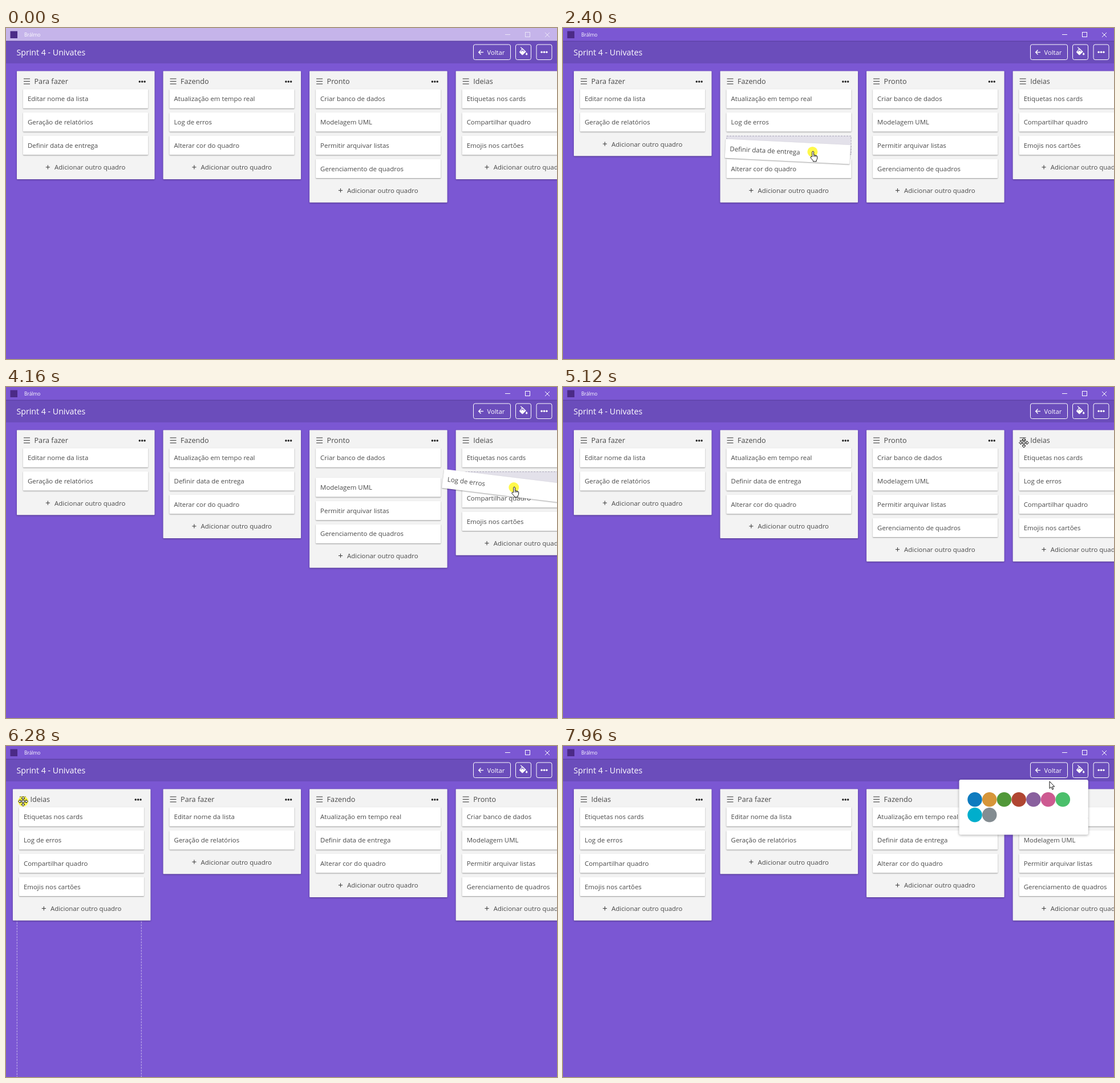
Write an HTML page with a canvas that moves like this. It is 966 px wide and 580 px high and loops after 8000 ms.

```html
<!DOCTYPE html>
<html lang="pt">
<head>
<meta charset="utf-8">
<title>Quadro</title>
<style>
html, body { margin: 0; width: 100%; height: 100%; overflow: hidden; background: #7b57d3; }
canvas { display: block; }
</style>
</head>
<body>
<canvas id="stage" width="966" height="580"></canvas>
<script>
const ctx = document.getElementById('stage').getContext('2d');
const LOOP = 8000, SETTLE = 240, PITCH = 40.75, CARD_W = 219, CARD_H = 33.4, COL_W = 241.5;
const BG = '#7b57d3', INK = '#4a4a4a';

const titles = ['Para fazer', 'Fazendo', 'Pronto', 'Ideias'];
const cards = {
  a: 'Editar nome da lista', b: 'Geração de relatórios', c: 'Definir data de entrega',
  d: 'Atualização em tempo real', e: 'Log de erros', f: 'Alterar cor do quadro',
  g: 'Criar banco de dados', h: 'Modelagem UML', i: 'Permitir arquivar listas', j: 'Gerenciamento de quadros',
  k: 'Etiquetas nos cards', l: 'Compartilhar quadro', m: 'Emojis nos cartões'
};
const swatches = ['#0e7bbf', '#d6963a', '#519839', '#b04632', '#89609e', '#cd5a91', '#4bbf6b', '#00aecc', '#838c91'];

// Each list: [start time, value]
const boards = [
  [0, ['abc', 'def', 'ghij', 'klm']],
  [1860, ['ab', 'decf', 'ghij', 'klm']],
  [3800, ['ab', 'dcf', 'gehij', 'klm']],
  [4090, ['ab', 'dcf', 'ghij', 'kelm']]
];
const orders = [[0, '0123'], [5620, '0132'], [5823, '0312'], [6060, '3012']];
const cursors = [[0, 'arrow'], [740, 'hand'], [4800, 'arrow'], [5040, 'move'], [6420, 'arrow'], [7160, 'hand'], [7780, 'arrow']];
const cardDrags = [{ id: 'c', from: 920, to: 2640 }, { id: 'e', from: 3440, to: 4420 }];
const colDrag = { id: '3', from: 5360, to: 6320 };
const presses = [...cardDrags, colDrag, { from: 7640, to: 7740 }];
const POPUP = 7680;

// Pointer path: time, x, y
const route = [
  [80, 800, 564], [320, 630, 460], [560, 350, 285], [840, 183, 206], [1160, 183, 206],
  [1360, 205, 208], [1640, 246, 216], [1900, 335, 224], [2200, 425, 222], [2560, 441, 214],
  [2680, 441, 214], [3400, 411.5, 167], [3490, 411.5, 167], [3600, 427.5, 160], [3760, 530, 162],
  [3960, 700, 172], [4160, 890, 176], [4340, 925, 172], [4440, 925, 172], [4700, 900, 140],
  [5080, 808, 98], [5340, 808, 97], [5480, 765, 97], [5720, 565, 99], [5920, 334, 101],
  [6100, 95, 99], [6200, 30, 97], [6330, 30, 97], [6720, 393, 86], [6900, 720, 70],
  [7060, 850, 66], [7200, 866, 46], [7460, 905, 44], [7700, 905, 44], [7960, 853, 62]
];

const lerp = (a, b, u) => a + (b - a) * u;
const clamp = (v, lo, hi) => Math.min(hi, Math.max(lo, v));
const easeOut = u => 1 - (1 - clamp(u, 0, 1)) ** 3;
const during = (t, d) => t >= d.from && t < d.to;

function stageAt(list, t) {
  const i = list.findLastIndex(s => t >= s[0]);
  return { prev: list[Math.max(0, i - 1)][1], cur: list[i][1], u: i ? easeOut((t - list[i][0]) / 200) : 1 };
}

// Monotone cubic through the route points
function along(t, axis) {
  const last = route.length - 1;
  if (t <= route[0][0]) return route[0][axis];
  if (t >= route[last][0]) return route[last][axis];
  const i = route.findLastIndex(p => t >= p[0]);
  const slope = j => j < 0 || j >= last ? 0 : (route[j + 1][axis] - route[j][axis]) / (route[j + 1][0] - route[j][0]);
  const tangent = j => {
    const a = slope(j - 1), b = slope(j);
    return a * b > 0 ? 2 * a * b / (a + b) : 0;
  };
  const h = route[i + 1][0] - route[i][0], u = (t - route[i][0]) / h, v = 1 - u;
  return route[i][axis] * (1 + 2 * u) * v * v + route[i + 1][axis] * u * u * (3 - 2 * u)
    + h * (tangent(i) * u * v * v - tangent(i + 1) * u * u * v);
}
const pointer = t => ({ x: along(t, 1), y: along(t, 2) });

const slotX = i => 19 + 256.55 * i;

function colX(id, t) {
  const { prev, cur, u } = stageAt(orders, t), to = slotX(cur.indexOf(id));
  return id === colDrag.id ? to : lerp(slotX(prev.indexOf(id)), to, u);
}

function cardSlot(id, t) {
  const { prev, cur, u } = stageAt(boards, t);
  const col = cur.findIndex(c => c.includes(id));
  const row = cur[col].indexOf(id), old = prev[col].indexOf(id);
  const held = cardDrags.some(d => d.id === id && t >= d.from && t < d.to + SETTLE);
  return { x: colX(String(col), t) + 11, y: 107.3 + PITCH * (old < 0 || held ? row : lerp(old, row, u)) };
}

// Follows the pointer, then settles into the slot
function dragPose(drag, t, home, slot) {
  const a = pointer(drag.from), b = pointer(Math.min(t, drag.to)), u = easeOut((t - drag.to) / SETTLE);
  return { x: lerp(home.x + b.x - a.x, slot.x, u), y: lerp(home.y + b.y - a.y, slot.y, u) };
}

function text(str, x, y, size, color, weight = 400) {
  ctx.font = `${weight} ${size}px "Open Sans", "Noto Sans", sans-serif`;
  ctx.fillStyle = color;
  ctx.fillText(str, x, y);
}
function box(x, y, w, h, fill, r = 0) {
  ctx.fillStyle = fill;
  ctx.beginPath();
  ctx.roundRect(x, y, w, h, r);
  ctx.fill();
}
function line(color, width, ...pts) {
  ctx.strokeStyle = color;
  ctx.lineWidth = width;
  ctx.beginPath();
  for (let i = 0; i < pts.length; i += 2) ctx.lineTo(pts[i], pts[i + 1]);
  ctx.stroke();
}
function dot(x, y, r, color) {
  ctx.fillStyle = color;
  ctx.beginPath();
  ctx.arc(x, y, r, 0, 7);
  ctx.fill();
}
function dots(x, y, color) {
  for (const d of [-4.4, 0, 4.4]) dot(x + d, y, 1.75, color);
}
function shadow(color, blur, y) {
  ctx.shadowColor = color;
  ctx.shadowBlur = blur;
  ctx.shadowOffsetY = y;
}
const noShadow = () => shadow('transparent', 0, 0);
function dashed(x, y, w, h, color) {
  ctx.setLineDash([3, 2]);
  ctx.strokeStyle = color;
  ctx.lineWidth = 1;
  ctx.strokeRect(x, y, w, h);
  ctx.setLineDash([]);
}

function drawCard(id, x, y) {
  shadow('rgba(0,0,0,.38)', 2, 1);
  box(x, y, CARD_W, CARD_H, '#fff', 1);
  noShadow();
  text(cards[id], x + 8, y + 21, 11.45, INK);
}

function drawColumn(id, t, x, y) {
  const { prev, cur, u } = stageAt(boards, t);
  const h = 67.3 + PITCH * lerp(prev[id].length, cur[id].length, u);
  ctx.save();
  ctx.translate(x, y);
  shadow('rgba(0,0,0,.35)', 3, 1);
  box(0, 0, COL_W, h, '#f3f3f3', 1);
  noShadow();
  for (const ly of [13.5, 18, 22.5]) line('#444', 1.1, 12, ly, 23, ly);
  text(titles[id], 30.5, 22.6, 12.65, '#484848');
  dots(219.7, 18.6, '#222');
  line('#444', 1.1, 50.8, h - 21.2, 58, h - 21.2);
  line('#444', 1.1, 54.4, h - 24.8, 54.4, h - 17.6);
  text('Adicionar outro quadro', 66, h - 16.8, 11.45, INK);
  for (const c of cur[id]) {
    const slot = cardSlot(c, t), cx = 11, cy = slot.y - 75.5;
    if (cardDrags.some(d => d.id === c && t >= d.from + 150 && t < d.to + SETTLE)) {
      box(cx, cy, CARD_W, CARD_H, '#e3e1ea');
      dashed(cx + .5, cy + .5, CARD_W - 1, CARD_H - 1, '#aaa6b8');
    } else drawCard(c, cx, cy);
  }
  ctx.restore();
}

function drawColumns(t) {
  const held = t >= colDrag.from && t < colDrag.to + SETTLE;
  const slot = { x: colX(colDrag.id, t), y: 75.5 };
  if (held) dashed(slot.x + .3, 110.5, 218, 480, 'rgba(255,255,255,.6)');
  for (const id of '0123') if (!held || id !== colDrag.id) drawColumn(id, t, colX(id, t), 75.5);
  if (held) {
    const p = dragPose(colDrag, t, { x: slotX(3), y: 75.5 }, slot);
    drawColumn(colDrag.id, t, p.x, p.y);
  }
}

function drawHeldCard(t) {
  const drag = cardDrags.find(d => t >= d.from + 150 && t < d.to + SETTLE);
  if (!drag) return;
  const p = dragPose(drag, t, cardSlot(drag.id, drag.from), cardSlot(drag.id, t));
  const tilt = clamp((along(t - 100, 1) - along(t - 250, 1)) * .2, -7, 7) * (1 - easeOut((t - drag.to) / SETTLE));
  ctx.save();
  ctx.translate(p.x + CARD_W / 2, p.y + CARD_H / 2);
  ctx.rotate(tilt * Math.PI / 180);
  drawCard(drag.id, -CARD_W / 2, -CARD_H / 2);
  ctx.restore();
}

function drawChrome(t, p) {
  const active = t >= 920, ctl = active ? '#fff' : 'rgba(255,255,255,.65)';
  box(0, 0, 966, 23, active ? BG : '#c5b4ea');
  box(0, 23, 966, 39, '#6b4dbb');
  box(0, 22.5, 966, 1.5, '#5e42a8');
  box(7.5, 5.5, 12.5, 12.5, '#4b2a87');
  text('Brálmo', 32, 15, 8.4, '#fff');
  line(ctl, 1, 875, 11.5, 884, 11.5);
  ctx.strokeRect(910.5, 7.5, 8, 8);
  line(ctl, 1, 945, 8, 953, 16);
  line(ctl, 1, 953, 8, 945, 16);
  text('Sprint 4 - Univates', 18.5, 48.3, 14.2, '#fff', 500);

  for (const [x, w] of [[819.5, 65], [893.5, 27], [930, 27]]) {
    const hover = t > 7000 && p.x > x && p.x < x + w && p.y > 29 && p.y < 56;
    box(x, 29, w, 26.5, hover ? 'rgba(255,255,255,.18)' : 'transparent', 3);
    ctx.strokeStyle = '#fff';
    ctx.lineWidth = 1;
    ctx.stroke();
  }
  line('#fff', 1.4, 837, 42.5, 829, 42.5);
  line('#fff', 1.4, 832.5, 38.5, 828.7, 42.5, 832.5, 46.5);
  text('Voltar', 843.5, 46.8, 11.2, '#fff', 500);
  dots(943.5, 42.3, '#fff');
  // Paint bucket
  ctx.fillStyle = '#fff';
  ctx.fill(new Path2D('M905.5 35.5l6.3 6-5.6 5.6q-.9.7-1.8 0l-4-4q-.7-.9 0-1.8zM912.7 42.8q3.4 4.3 0 4.8q-3.4-.5 0-4.8z'));
  line('#fff', 1.3, 902.3, 33.6, 906.5, 38);
  line('#6b4dbb', 1.1, 902.6, 41.2, 905.5, 38.3, 908.6, 41.2);
}

function drawPopup() {
  shadow('rgba(0,0,0,.35)', 4, 1);
  box(694.5, 59, 226.3, 96.5, '#fff', 3);
  noShadow();
  swatches.forEach((c, i) => dot(722 + 25.72 * (i % 7), i < 7 ? 93.8 : 120.8, 12.8, c));
}

const shapes = {
  arrow: 'M0 0V12.4L2.9 9.8 4.9 14.3 6.8 13.4 4.9 9.1H8.7Z',
  hand: 'M-.6 8.8V.6a1.4 1.4 0 0 1 2.8 0V5.6l4.8 1.2q1.5.4 1.5 2.2l-.3 3.6-1.4 2.4V17H1V15.4L-3.3 10.6q-.7-1.6.7-1.9z',
  move: 'M0-8.5L3-5.2H1V-1H5.2V-3L8.5 0 5.2 3V1H1V5.2H3L0 8.5-3 5.2H-1V1H-5.2V3L-8.5 0-5.2-3V-1H-1V-5.2H-3Z'
};
function drawPointer(t, p) {
  if (t < 80) return;
  const kind = cursors.findLast(c => t >= c[0])[1];
  if (presses.some(d => during(t, d))) dot(p.x, p.y, 9, 'rgba(255,248,50,.88)');
  ctx.save();
  ctx.translate(p.x, p.y);
  const shape = new Path2D(shapes[kind]);
  ctx.fillStyle = '#fff';
  ctx.fill(shape);
  ctx.strokeStyle = '#111';
  ctx.lineWidth = 1;
  ctx.lineJoin = 'round';
  ctx.stroke(shape);
  if (kind === 'hand') for (const x of [2.2, 4.3, 6.4]) line('#111', .8, x, 6, x, 9);
  ctx.restore();
}

function frame() {
  const t = performance.now() % LOOP, p = pointer(t);
  box(0, 0, 966, 580, BG);
  drawColumns(t);
  drawChrome(t, p);
  drawHeldCard(t);
  if (t >= POPUP) drawPopup();
  drawPointer(t, p);
  requestAnimationFrame(frame);
}
frame();
</script>
</body>
</html>
```
